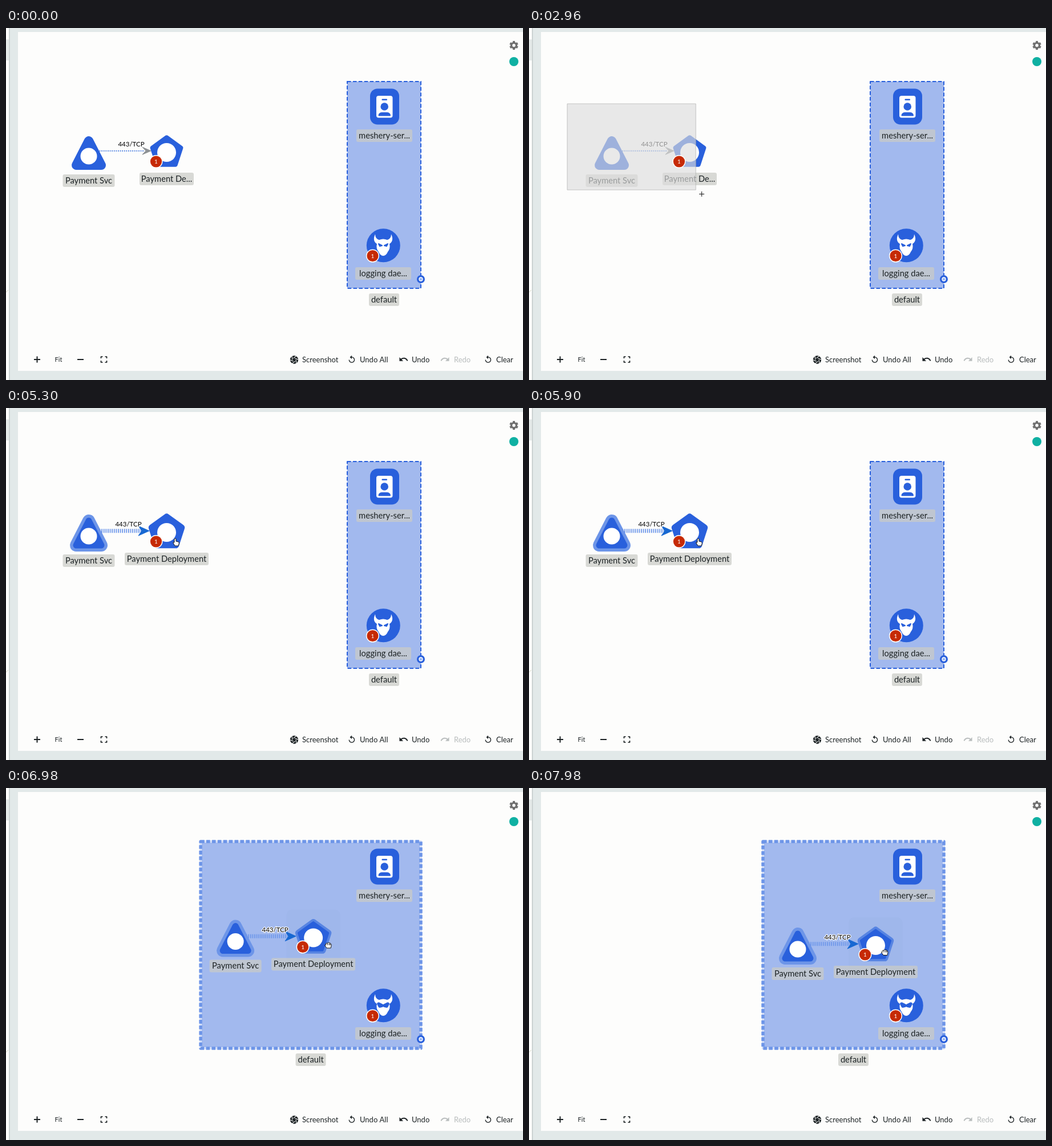
Recreate the animation shown at these times as an HTML page with a canvas. Size 906 by 618 pixels, loop 8 s.

```html
<!DOCTYPE html>
<html lang="en">
<head>
<meta charset="utf-8">
<title>Design canvas</title>
<style>
  html, body { margin: 0; width: 100%; height: 100%; overflow: hidden; background: #e2e9e9; }
  canvas { display: block; width: 906px; height: 618px; }
</style>
</head>
<body>
<canvas id="stage" width="906" height="618"></canvas>
<script>
const ctx = document.getElementById('stage').getContext('2d');
const LOOP = 8000, BLUE = '#2960dc', HALO = '#6d95e8', INK = '#1c2224', PAPER = '#fdfdfc';
const SELECT_END = 3400, HOVER = 4800, GRAB = 5950, JOIN = 6650;

// Keys: [time, x, y]
const boxCursor = [[2000, 67, 133], [2085, 76, 136], [2120, 84.5, 139], [2925, 292, 284],
  [2960, 302.5, 291.5], [3300, 350, 305]];
const handCursor = [[4100, 350, 305], [4950, 297, 235], [5950, 297, 235], [6200, 345, 243],
  [6420, 435.5, 257], [6700, 515, 269], [6980, 564, 276], [7440, 603, 285], [7980, 623, 288.5]];
const dragOffset = [[6000, 0, 0], [6210, 36, 7], [6420, 116, 23], [6600, 181, 34], [6700, 207, 38],
  [6980, 257, 44.5], [7440, 304, 54], [7980, 326, 58]];

// Smooth path through the keys, holding still at both ends.
function follow(keys, t) {
  const last = keys.length - 1;
  if (t <= keys[0][0]) return keys[0].slice(1);
  if (t >= keys[last][0]) return keys[last].slice(1);
  let i = 0;
  while (keys[i + 1][0] <= t) i++;
  const span = keys[i + 1][0] - keys[i][0], u = (t - keys[i][0]) / span;
  const slope = (k, d) => {
    if (k === 0 || k === last) return 0;
    const a = (keys[k][d] - keys[k - 1][d]) / (keys[k][0] - keys[k - 1][0]);
    const b = (keys[k + 1][d] - keys[k][d]) / (keys[k + 1][0] - keys[k][0]);
    return a * b > 0 ? 2 * a * b / (a + b) : 0;
  };
  return [1, 2].map(d => {
    const from = keys[i][d], to = keys[i + 1][d];
    return from + (to - from) * u * u * (3 - 2 * u)
      + span * u * (1 - u) * (slope(i, d) * (1 - u) - slope(i + 1, d) * u);
  });
}

function rect(x, y, w, h, fill, radius = 0) {
  ctx.fillStyle = fill;
  ctx.beginPath();
  ctx.roundRect(x, y, w, h, radius);
  ctx.fill();
}

function circle(x, y, r, fill, stroke, width) {
  ctx.beginPath();
  ctx.arc(x, y, r, 0, Math.PI * 2);
  if (fill) { ctx.fillStyle = fill; ctx.fill(); }
  if (stroke) { ctx.strokeStyle = stroke; ctx.lineWidth = width; ctx.stroke(); }
}

function lines(points, color, width, closed) {
  ctx.beginPath();
  points.forEach(([x, y]) => ctx.lineTo(x, y));
  if (closed) ctx.closePath();
  ctx.strokeStyle = color;
  ctx.lineWidth = width;
  ctx.stroke();
}

function polygon(points, fill, round = 0) {
  ctx.lineJoin = 'round';
  lines(points, fill, round * 2, true);
  ctx.fillStyle = fill;
  ctx.fill();
}

function text(str, x, y, size, color = INK, align = 'left') {
  ctx.font = `${size}px Lato, sans-serif`;
  ctx.textAlign = align;
  ctx.textBaseline = 'alphabetic';
  ctx.fillStyle = color;
  ctx.fillText(str, x, y);
}

function label(str, x, y, width) {
  rect(x - width / 2, y - 11, width, 22, 'rgba(203,204,198,.72)', 3);
  text(str, x, y + 4.5, 14.7, INK, 'center');
}

function icon(path, x, y, scale, fill, stroke) {
  ctx.save();
  ctx.translate(x, y);
  ctx.scale(scale, scale);
  const shape = new Path2D(path);
  ctx.fillStyle = fill;
  ctx.fill(shape);
  if (stroke) { ctx.strokeStyle = stroke; ctx.lineWidth = 1; ctx.stroke(shape); }
  ctx.restore();
}

function badge(x, y) {
  circle(x, y, 10.8, '#c62a05', '#fff', 1.4);
  text('1', x, y + 3.5, 10, '#fff', 'center');
}

const UNDO = 'M12.5 8c-2.65 0-5.05.99-6.9 2.6L2 7v9h9l-3.62-3.62c1.39-1.16 3.16-1.88 5.12-1.88 3.54 0 6.55 2.31 7.6 5.5l2.37-.78C21.08 11.03 17.15 8 12.5 8z';
const REPLAY = 'M12 5V1L7 6l5 5V7c3.31 0 6 2.69 6 6s-2.69 6-6 6-6-2.69-6-6H4c0 4.42 3.58 8 8 8s8-3.58 8-8-3.58-8-8-8z';
const DEVIL = 'M-14-20C-18-12-16-6-11-3Q-13 5-8 11Q-5 18 0 18Q5 18 8 11Q13 5 11-3C16-6 18-12 14-20Q14-12 7-10Q0-13-7-10Q-14-12-14-20Z';
const POINTER = 'M-2-5Q0-7 1-5V-1L5 0Q7 1 6 4L5 7H-1L-4 2Q-5 0-2 1Z';
const FIST = 'M-4-2Q-3-5-1-3Q0-6 2-4Q4-5 4-3Q6-3 6 0L5 5H-2L-5 1Q-6-1-4 0ZM-1-3V0M2-3V0M4-3V0';

function drawPage() {
  rect(0, 0, 906, 618, '#e2e9e9');
  rect(0, 0, 5, 618, PAPER);
  rect(0, 20, 5, 37, '#e5eae9');
  rect(5, 0, 2, 618, '#cbd2d2');
  lines([[0, 464], [4, 460]], '#d5d8c4', 1);
  rect(21, 7, 885, 595, PAPER);
  // Settings
  for (let i = 0; i < 6; i++) {
    const a = Math.PI * (i / 3 + 1 / 6), x = Math.cos(a), y = Math.sin(a);
    lines([[890 + 4 * x, 30.5 + 4 * y], [890 + 7.7 * x, 30.5 + 7.7 * y]], '#707070', 4);
  }
  circle(890, 30.5, 4.4, PAPER, '#707070', 3.4);
  circle(890, 59, 8, '#0fb0a2');
}

function drawToolbar() {
  lines([[49, 582], [60, 582]], INK, 2);
  lines([[54.5, 576.5], [54.5, 587.5]], INK, 2);
  text('Fit', 92, 586, 11, INK, 'center');
  lines([[125, 582], [136, 582]], INK, 2);
  for (const [sx, sy] of [[-1, -1], [1, -1], [1, 1], [-1, 1]])
    lines([[171.5 + sx * 5, 582 + sy * 2], [171.5 + sx * 5, 582 + sy * 5], [171.5 + sx * 2, 582 + sy * 5]], INK, 1.7);

  circle(505, 582.5, 7.2, INK);
  for (let i = 0; i < 6; i++) {
    const a = i * Math.PI / 3, at = (r, b) => [505 + r * Math.cos(b), 582.5 + r * Math.sin(b)];
    lines([at(3, a), at(7.2, a + 1)], '#fff', 1.1);
  }
  icon(REPLAY, 598, 574, .66, INK);
  icon(UNDO, 688, 573, .73, INK);
  ctx.save();
  ctx.translate(778, 573);
  ctx.scale(-1, 1);
  icon(UNDO, 0, 0, .73, '#b9bdbd');
  ctx.restore();
  icon(REPLAY, 837, 574, .66, INK);
  text('Screenshot', 519, 587, 13);
  text('Undo All', 620, 587, 13);
  text('Undo', 711, 587, 13);
  text('Redo', 785, 587, 13, '#b9bdbd');
  text('Clear', 859, 587, 13);
}

function drawGroup(left, active) {
  rect(left, 94, 727 - left, 363, '#a2b9ee');
  if (active) {
    ctx.strokeStyle = '#d6e0f7';
    ctx.lineWidth = 4;
    ctx.strokeRect(left, 94, 727 - left, 363);
  }
  ctx.strokeStyle = active ? HALO : BLUE;
  ctx.lineWidth = active ? 5.5 : 2;
  ctx.setLineDash([6.6, 3.3]);
  ctx.strokeRect(left, 94, 727 - left, 363);
  ctx.setLineDash([]);
  label('default', (left + 727) / 2, 477, 53);

  rect(638, 106.5, 51, 63, BLUE, 13);
  rect(649, 119, 28.5, 38.5, '#fff', 4);
  rect(658.5, 124.5, 9.5, 2.5, BLUE, 1);
  circle(663.2, 138, 6.8, BLUE);
  rect(652.5, 148, 21.5, 6.5, BLUE, [7, 7, 1, 1]);
  label('meshery-ser...', 663, 189, 98);

  circle(661.3, 381.8, 29.5, BLUE);
  icon(DEVIL, 661, 382, 1, '#fff');
  polygon([[653, 379], [659, 382], [655, 383]], BLUE);
  polygon([[669, 379], [663, 382], [667, 383]], BLUE);
  label('logging dae...', 661, 431, 98);
  badge(642.5, 400);
  circle(727, 441, 5, '#9ab6f0', BLUE, 4);
  circle(727, 441, 3, null, '#fff', 1.3);
}

function drawPayment(t, selected) {
  const dragging = t >= GRAB;
  if (dragging) rect(234.5, 169, 94, 95, 'rgba(60,90,130,.025)', 9);

  // Connection
  ctx.setLineDash([1.8, 1.8]);
  lines([[160, 215.7], [selected ? 238 : 243, 215.7]], selected ? '#6f98ea' : '#4c7fe0', selected ? 7 : 2);
  ctx.setLineDash([]);
  const tip = selected ? 251 : 254, back = selected ? 19 : 15, half = selected ? 8.5 : 6.5;
  polygon([[tip, 215.7], [tip - back, 215.7 - half], [tip - back + 6, 215.7], [tip - back, 215.7 + half]],
    selected ? '#1768d2' : '#8d9194', .5);
  const labelX = selected ? 214.5 : 219.5;
  ctx.font = '11.5px Lato, sans-serif';
  ctx.textAlign = 'center';
  ctx.strokeStyle = '#fff';
  ctx.lineWidth = 2.5;
  ctx.strokeText('443/TCP', labelX, 208);
  text('443/TCP', labelX, 208, 11.5, '#000', 'center');

  const triangle = [[145, 198], [123, 241], [167, 241]];
  if (selected) polygon(triangle, HALO, 11);
  polygon(triangle, BLUE, selected ? 5.5 : 8);
  circle(145, 225, 14.5, '#fff');
  label('Payment Svc', 145, 268, 91);

  const pentagon = Array.from({ length: 5 }, (_, i) => {
    const a = i * Math.PI * .4 - Math.PI / 2;
    return [281.5 + 27 * Math.cos(a), 218.5 + 27 * Math.sin(a)];
  });
  const hovered = t >= HOVER && !dragging;
  if (selected) polygon(pentagon, hovered ? BLUE : '#5784e2', 6);
  polygon(pentagon, BLUE, selected ? 2 : 3.3);
  circle(281.5, 218.5, 16.5, '#fff');
  if (selected) label('Payment Deployment', 281.5, 265, 147);
  else label('Payment De...', 281.5, 265, 95);
}

function drawCrosshair([x, y]) {
  lines([[x - 4.5, y], [x + 4.5, y]], '#222', 1.1);
  lines([[x, y - 4.5], [x, y + 4.5]], '#222', 1.1);
}

function render(t) {
  const selected = t >= SELECT_END, [dx, dy] = follow(dragOffset, t);
  const left = t >= JOIN ? Math.min(598, 84 + dx) : 598;
  drawPage();
  drawGroup(left, t >= 6300);
  ctx.save();
  ctx.translate(dx, dy);
  drawPayment(t, selected);
  ctx.restore();

  if (t >= 2000 && !selected) {
    const [x, y] = follow(boxCursor, t - 35);
    rect(67, 133, x - 67, y - 133, 'rgba(221,221,221,.65)');
    ctx.strokeStyle = 'rgba(170,170,170,.65)';
    ctx.lineWidth = 1;
    ctx.strokeRect(67, 133, x - 67, y - 133);
  }
  badge(263 + dx, 234.5 + dy);
  drawToolbar();

  if (t >= 1700 && t < 4600) drawCrosshair(follow(t < 3800 ? boxCursor : handCursor, t));
  else if (t >= 4600) {
    const [x, y] = follow(handCursor, t);
    icon(t < GRAB ? POINTER : FIST, x, y, 1, '#fff', '#161616');
  }
}

function tick(now) {
  render(now % LOOP);
  requestAnimationFrame(tick);
}
requestAnimationFrame(tick);
</script>
</body>
</html>
```
